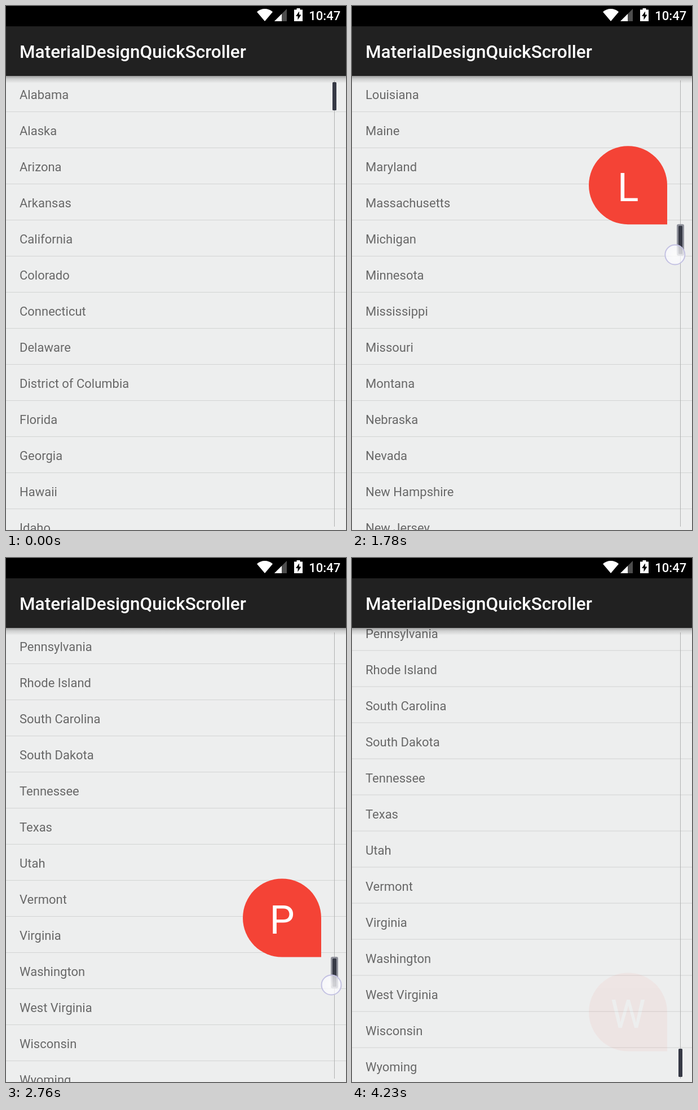
An HTML page for the animation above (5510 ms loop, 603x929 px).

```html
<!DOCTYPE html>
<html lang="en">
<head>
<meta charset="utf-8">
<title>MaterialDesignQuickScroller</title>
<style>
  html, body { margin: 0; width: 100%; height: 100%; overflow: hidden; background: #edeeee; }
  svg { display: block; width: 603px; height: 929px; }
  text { font-family: Roboto, "Open Sans", sans-serif; }
  .row { font-size: 22px; fill: #686868; }
  .bold { font-weight: 500; fill: #fff; }
</style>
</head>
<body>
<svg viewBox="0 0 603 929" xmlns="http://www.w3.org/2000/svg">
  <defs>
    <linearGradient id="shade" x2="0" y2="1">
      <stop offset="0" stop-color="#000" stop-opacity=".34"/>
      <stop offset=".4" stop-color="#000" stop-opacity=".13"/>
      <stop offset="1" stop-color="#000" stop-opacity="0"/>
    </linearGradient>
    <radialGradient id="glow">
      <stop offset="0" stop-color="#fff" stop-opacity=".8"/>
      <stop offset="1" stop-color="#fafaff" stop-opacity=".7"/>
    </radialGradient>
  </defs>
  <rect width="603" height="929" fill="#edeeee"/>
  <g id="list"></g>
  <rect x="582" y="132" width="1" height="791" fill="#b1b2b2"/>
  <g id="bubble">
    <path d="M139 139H69.5A69.5 69.5 0 1 1 139 69.5Z" fill="#f44336"/>
    <text id="letter" x="69.5" y="97.5" font-size="70" text-anchor="middle" fill="#fff"></text>
  </g>
  <g id="handle">
    <rect id="rim" x="576" y="-28" width="13" height="56" rx="3" fill="#8f919b"/>
    <rect x="579" y="-25" width="7" height="50" rx="1.5" fill="#363945"/>
  </g>
  <circle id="touch" r="17.5" fill="url(#glow)" stroke="#c3c1e2" stroke-width="2"/>
  <rect y="124" width="603" height="13" fill="url(#shade)"/>
  <rect width="603" height="36" fill="#000"/>
  <rect y="36" width="603" height="88" fill="#212121"/>
  <text class="bold" x="24" y="92" font-size="31.5">MaterialDesignQuickScroller</text>
  <text class="bold" x="537.3" y="25" font-size="22">10:47</text>
  <path d="M459 27L445 10.5Q451 5 459 5T473 10.5Z" fill="#fff"/>
  <path d="M498 5V27H476Z" fill="#4d4d4d"/>
  <path d="M489 14V27H476Z" fill="#fff"/>
  <path d="M515.5 4H521.5V6.500H526V27H511V6.500H515.500Z" fill="#fff"/>
  <path d="M520 9.500L514 18H517.500V24.500L523.500 15.500H520Z" fill="#000"/>
</svg>
<script>
const states = `Alabama,Alaska,Arizona,Arkansas,California,Colorado,Connecticut,Delaware,District of Columbia,Florida,Georgia,Hawaii,Idaho,Illinois,Indiana,Iowa,Kansas,Kentucky,Louisiana,Maine,Maryland,Massachusetts,Michigan,Minnesota,Mississippi,Missouri,Montana,Nebraska,Nevada,New Hampshire,New Jersey,New Mexico,New York,North Carolina,North Dakota,Ohio,Oklahoma,Oregon,Pennsylvania,Rhode Island,South Carolina,South Dakota,Tennessee,Texas,Utah,Vermont,Virginia,Washington,West Virginia,Wisconsin,Wyoming`.split(",");

const LOOP = 5510, START = 800, STEP = 70, LAST = 49;
const TOP = 124, VIEW = 805, ROW = 64, MAX_SCROLL = 2455.5;
const $ = id => document.getElementById(id);
const clamp = (v, lo, hi) => Math.min(hi, Math.max(lo, v));

// step, handle centre, touch x, touch y relative to the handle
const drag = [
  [0, 160, 583, 13], [2, 176, 582, 13], [6, 221, 574, 27], [9, 288, 562, 38],
  [15, 440, 575, 24], [18, 507, 581, 8], [20, 476, 581, -5], [24, 585, 584, 16],
  [28, 735, 577, 22], [30, 782, 573, 14], [33, 646, 569, 8], [35, 669, 568, 20],
  [39, 800, 574, 22], [44, 902, 578, 10], [49, 902, 578, 4]
];

function pose(step) {
  const i = clamp(drag.findIndex(k => k[0] > step), 1, drag.length - 1);
  const j = step >= LAST ? drag.length - 1 : i;
  const a = drag[j - 1], b = drag[j], p = (step - a[0]) / (b[0] - a[0]);
  return a.map((v, n) => v + (b[n] - v) * p).slice(1);
}

function svg(tag, attrs, text = "") {
  const el = document.createElementNS("http://www.w3.org/2000/svg", tag);
  for (const name in attrs) el.setAttribute(name, attrs[name]);
  el.textContent = text;
  $("list").append(el);
}

states.forEach((name, i) => {
  svg("text", { class: "row", x: 24, y: 165 + i * ROW }, name);
  if (i < states.length - 1)
    svg("rect", { x: 0, y: 187 + i * ROW, width: 603, height: 1, fill: "#d2d4d3" });
});

const move = (id, x, y) => $(id).setAttribute("transform", `translate(${x} ${y})`);
const fade = (id, a) => $(id).setAttribute("opacity", a);

function bubbleAlpha(step) {
  if (step < 0) return 0;
  if (step < 3) return [0, .5, .91][step];
  return step < 48 ? 1 : step === 48 ? .45 : .05;
}

function draw(t) {
  const step = Math.min(LAST, Math.floor((t - START) / STEP));
  const idle = step < 0 || step > 47;
  const [centre, x, dy] = pose(Math.max(0, step));
  const index = Math.floor((centre - TOP) / VIEW * states.length);

  move("list", 0, -(step < 0 ? 0 : Math.min(index * ROW, MAX_SCROLL)));
  move("handle", 0, !idle ? centre : step < 0 ? 160 : 895);
  fade("rim", idle ? 0 : 1);
  move("bubble", 420, Math.max(TOP, centre - 28 - 138.5));
  fade("bubble", bubbleAlpha(step));
  $("letter").textContent = states[index][0];
  move("touch", x, centre + dy);
  fade("touch", step < 0 || step > 45 ? 0 : 1);
}

const begin = performance.now();
function tick() {
  draw((performance.now() - begin) % LOOP);
  requestAnimationFrame(tick);
}
tick();
</script>
</body>
</html>
```
